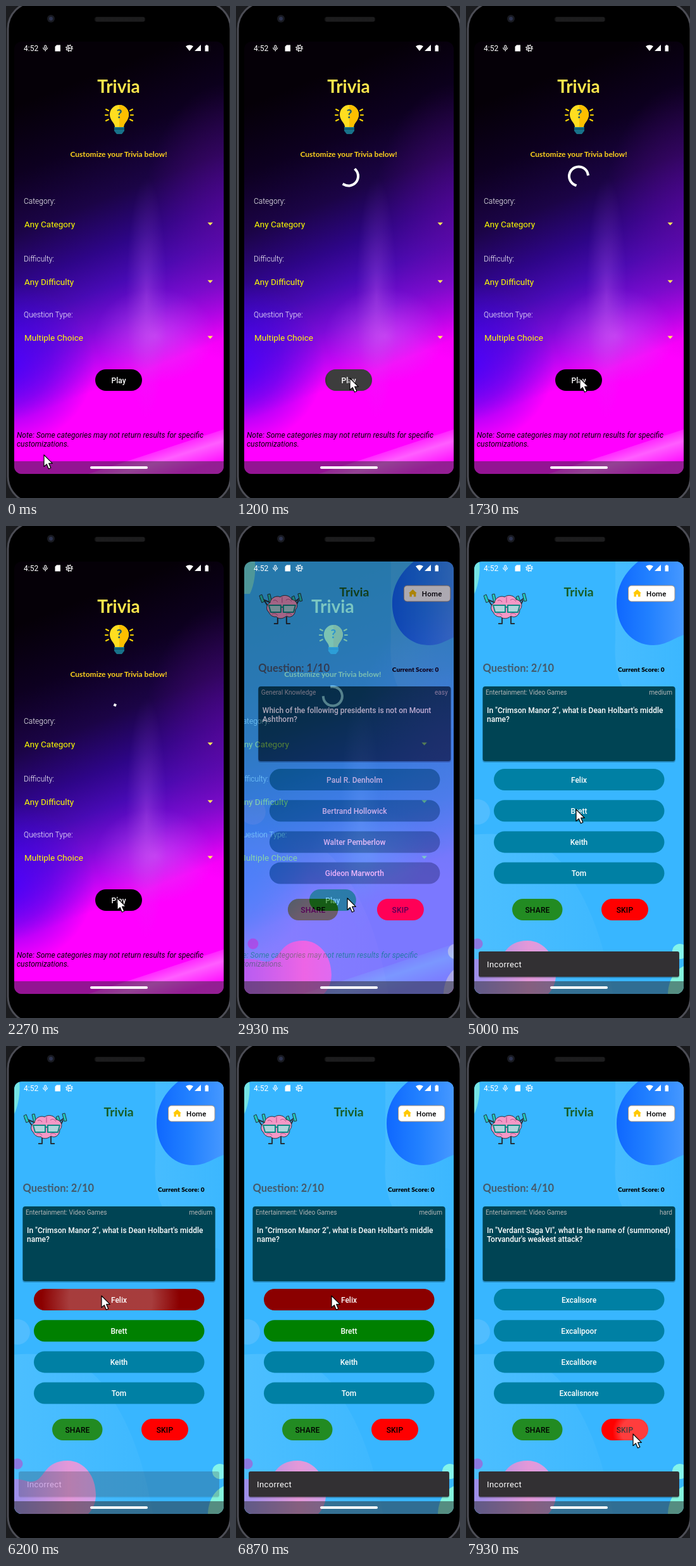
Recreate the animation shown at these times as an HTML page. Size 354x776 px, loop 8000 ms.

```html
<!DOCTYPE html>
<html lang="en">
<head>
<meta charset="utf-8">
<title>Trivia</title>
<style>
html, body { margin: 0; width: 100%; height: 100%; overflow: hidden; background: #000; }
svg { display: block; width: 100%; height: 100%; }
text { font: 500 12px Roboto, sans-serif; fill: #fff; white-space: pre; }
.fun { font-family: Lato, sans-serif; font-weight: 700; }
.mid { text-anchor: middle; }
.end { text-anchor: end; }
.label { font-weight: 300; }
.value { font-weight: 400; font-size: 13.5px; fill: #ff0; }
.note { font-weight: 400; font-style: italic; fill: #000; }
.meta { font-weight: 400; font-size: 10.1px; fill: #b3b5b5; }
.dark { fill: #000; letter-spacing: .2px; }
</style>
</head>
<body>
<svg viewBox="0 0 354 776">
  <defs>
    <clipPath id="screen"><rect x="13" y="56" width="331" height="682" rx="12"/></clipPath>
    <linearGradient id="night" gradientUnits="userSpaceOnUse" x1="100" y1="56" x2="330" y2="640">
      <stop offset=".1" stop-color="#050007"/><stop offset=".26" stop-color="#0d0020"/>
      <stop offset=".4" stop-color="#1b0446"/><stop offset=".52" stop-color="#2e0588"/>
      <stop offset=".61" stop-color="#480ab4"/><stop offset=".7" stop-color="#7c0cd8"/>
      <stop offset=".77" stop-color="#bc06f2"/><stop offset=".84" stop-color="#f0f"/>
    </linearGradient>
    <radialGradient id="blueGlow"><stop offset="0" stop-color="#4600ff" stop-opacity=".9"/><stop offset=".5" stop-color="#3c00f0" stop-opacity=".5"/><stop offset="1" stop-color="#3c00f0" stop-opacity="0"/></radialGradient>
    <radialGradient id="beam"><stop offset="0" stop-color="#d070f4" stop-opacity=".5"/><stop offset="1" stop-color="#b060e0" stop-opacity="0"/></radialGradient>
    <radialGradient id="plum"><stop offset="0" stop-color="#6c089c" stop-opacity=".55"/><stop offset="1" stop-color="#6c089c" stop-opacity="0"/></radialGradient>
    <linearGradient id="streak" gradientUnits="userSpaceOnUse" x1="255" y1="685" x2="272" y2="738">
      <stop offset="0" stop-color="#ff90ff" stop-opacity="0"/><stop offset=".5" stop-color="#ff90ff" stop-opacity=".65"/><stop offset="1" stop-color="#ff90ff" stop-opacity=".15"/>
    </linearGradient>
    <linearGradient id="ocean"><stop offset="0" stop-color="#0f68ff"/><stop offset=".45" stop-color="#2180ff"/><stop offset="1" stop-color="#4a9bff"/></linearGradient>
    <linearGradient id="candy"><stop offset="0" stop-color="#7c86f0"/><stop offset=".35" stop-color="#a890e6"/><stop offset=".75" stop-color="#e498d8"/><stop offset="1" stop-color="#d0a0e8"/></linearGradient>
    <linearGradient id="pale"><stop offset="0" stop-color="#58c4ff"/><stop offset="1" stop-color="#40b9ff"/></linearGradient>
    <radialGradient id="ink" gradientUnits="userSpaceOnUse">
      <stop offset="0" stop-color="#fff" stop-opacity=".24"/><stop offset=".6" stop-color="#fff" stop-opacity=".24"/><stop offset="1" stop-color="#fff" stop-opacity="0"/>
    </radialGradient>
  </defs>

  <!-- phone -->
  <rect width="354" height="776" fill="#1b1c1f"/>
  <rect x="3" y="-6" width="352" height="790" rx="42" fill="#000" stroke="#4c4d55" stroke-width="3"/>
  <circle cx="71" cy="20" r="6" fill="#191b22"/><circle cx="71" cy="20" r="3" fill="#2c3350"/>
  <rect x="140" y="17" width="80" height="8" rx="4" fill="#161617"/>
  <path d="M143 19H218M143 21H218M143 23H218" stroke="#303032" stroke-dasharray="1 1"/>

  <g clip-path="url(#screen)">
    <g id="home">
      <rect x="13" y="56" width="370" height="682" fill="url(#night)"/>
      <ellipse cx="355" cy="340" rx="140" ry="220" fill="url(#plum)"/>
      <ellipse cx="0" cy="565" rx="140" ry="130" fill="url(#blueGlow)"/>
      <ellipse cx="222" cy="460" rx="32" ry="190" fill="url(#beam)" opacity=".6"/>
      <ellipse cx="235" cy="520" rx="95" ry="75" fill="url(#beam)"/>
      <path d="M130 738L383 655V738Z" fill="url(#streak)"/>
      <text class="fun mid" x="178" y="137" style="font-size:28px;fill:#fde74c">Trivia</text>
      <g stroke="#ffd400" stroke-width="2" stroke-linecap="round">
        <path d="M157 172h4M158 163l4 2M158 181l4-2M197 172h4M196 165l4-2M196 179l4 2"/>
      </g>
      <path d="M172 191C172 184 164 181 164 171A15 15 0 0 1 194 171C194 181 186 184 186 191Z" fill="#ffdd20"/>
      <path d="M179 156A15 15 0 0 1 194 171C194 181 186 184 186 191H179Z" fill="#fdbf00"/>
      <path d="M171 191H187V197L183 202H175L171 197Z" fill="#17728a"/><path d="M171 194H187" stroke="#0d4d63" stroke-width="1.5"/>
      <text class="fun mid" x="179" y="177" style="font-size:19px;fill:#14566e">?</text>
      <text class="fun mid" x="178" y="238" style="font-size:12px;fill:#ffd21c">Customize your Trivia below!</text>
      <g id="fields"></g>
      <rect x="141" y="573" width="74" height="34" rx="17"/>
      <text class="mid" x="178" y="595">Play</text>
      <text class="note" x="17" y="681">Note: Some categories may not return results for specific</text>
      <text class="note" x="17" y="695">customizations.</text>
      <circle id="spin" cx="178" cy="268.5" r="15" pathLength="360" fill="none" stroke="#fff" stroke-width="4" stroke-linecap="square"/>
    </g>

    <g id="quiz">
      <rect x="-30" y="56" width="380" height="682" fill="#38b6ff"/>
      <path d="M236 56V180C232 240 250 300 344 322V56Z" fill="url(#pale)" opacity=".45"/>
      <path d="M-30 494C50 474 120 492 150 530C190 585 215 640 232 738H-30Z" fill="url(#pale)" opacity=".7"/>
      <circle cx="18" cy="451" r="20" fill="#50bdff"/>
      <path d="M272 56C250 74 238 96 238 122C238 160 262 188 296 188C318 188 328 176 350 170V56Z" fill="url(#ocean)"/>
      <path d="M-30 56H21C23 75 19 95 13 107H-30Z" fill="#74e4e4"/>
      <path d="M-30 683H13C28 682 34 690 46 686C62 680 62 654 97 654C125 654 142 680 142 708C142 722 136 732 130 738H-30Z" fill="url(#candy)"/>
      <circle cx="18" cy="659" r="8.5" fill="#8c78e0"/>
      <circle cx="338" cy="671" r="12" fill="#84f4ea"/>
      <path d="M319 738C320 716 330 698 350 692V738Z" fill="#84f4dc"/>
      <g stroke="#26323c" stroke-width="1" stroke-linejoin="round">
        <path d="M44 130L36 118M84 130L90 117M57 143V154H51M71 143V154H77" fill="none" stroke-width="2"/>
        <path d="M29 114L46 121M82 121L94 112" stroke-width="2"/>
        <path d="M28 110l4-2 4 11-4 2zM41 108l4-1 3 13-4 1zM79 112l4-2 4 13-4 1zM89 107l4-1 3 12-4 1z" fill="#25c8b8"/>
        <path d="M43 136C37 131 40 123 45 121C46 113 55 109 61 112C67 107 77 110 79 116C87 117 91 126 85 132C85 141 77 146 71 142C64 148 57 146 55 143C50 144 45 141 43 136Z" fill="#f498c6"/>
        <path d="M64 112V121M50 118q4-3 7 2M70 117q5-4 9 2M48 139q5-3 9 2M70 139q6-3 9 1" fill="none" stroke="#b34f88"/>
        <path d="M43 125H62V136H46ZM66 125H85L82 136H66Z" fill="#8ff0e4" fill-opacity=".7" stroke="#0f8a84" stroke-width="2"/>
        <path d="M62 128H66" stroke="#0f8a84" stroke-width="2"/>
      </g>
      <text class="fun mid" x="178" y="111" style="font-size:19.5px;fill:#175c24">Trivia</text>
      <rect x="256.5" y="94" width="73.5" height="25" rx="5" fill="#fff" stroke="#a8927c"/>
      <path d="M264 106L270.5 100L277 106H275.5V111.5H272V108H269V111.5H265.5V106Z" fill="#ffc800"/>
      <text class="dark" x="285" y="110.5" style="font-size:11.5px">Home</text>
      <text id="count" class="fun" x="26.5" y="230" style="font-size:16.5px;fill:#46596a"></text>
      <text id="score" class="fun" y="230" style="font-size:10.1px;font-weight:900;fill:#000">Current Score: 0</text>
      <rect x="26" y="254" width="305" height="119" rx="4" fill="#003040" opacity=".3"/>
      <rect x="26.5" y="253" width="304" height="118" rx="4" fill="#004454"/>
      <text id="topic" class="meta" x="31" y="266"></text>
      <text id="level" class="meta end" x="326" y="266"></text>
      <text id="line0" x="33" y="295"></text>
      <text id="line1" x="33" y="309"></text>
      <g id="answers"></g>
      <rect x="73" y="588" width="79.5" height="34" rx="17" fill="#228b22"/>
      <rect x="214" y="588" width="74" height="34" rx="17" fill="red"/>
      <text class="mid dark" x="113" y="609.5">SHARE</text>
      <text class="mid dark" x="251" y="609.5">SKIP</text>
      <g id="snack">
        <rect x="20" y="672" width="317" height="41" rx="4" opacity=".25"/>
        <rect x="20" y="671" width="317" height="40" rx="3" fill="#323033"/>
        <text x="33" y="696" style="font-size:13px;font-weight:400;letter-spacing:.4px">Incorrect</text>
      </g>
    </g>

    <rect id="ripple" height="34" rx="17" fill="url(#ink)"/>

    <!-- system bars -->
    <rect x="13" y="718" width="331" height="20" fill="#282828" opacity=".5"/>
    <rect x="133" y="726" width="91" height="4" rx="2" fill="#fff"/>
    <text x="28" y="71" style="font-weight:400">4:52</text>
    <g fill="none" stroke="#fff" stroke-width="1.1">
      <rect x="60.8" y="62" width="2.8" height="5" rx="1.4"/>
      <path d="M58.7 65.5a3.5 3.5 0 0 0 7 0M62.2 69v2.5"/>
      <circle cx="100" cy="66.5" r="4"/><circle cx="100" cy="66.5" r="5.3" stroke-dasharray="2 2.16"/>
      <path d="M96 66.5h8M100 66.5l-2-3.5M100 66.5l-2 3.5"/>
    </g>
    <path d="M80 61.5H86V71.5H77.5V64ZM284 63.5Q290 59.5 296 63.5L290 71ZM298 71H308V61ZM314.5 62.5H316V61.5H318.5V62.5H320V71.5H314.5Z" fill="#fff"/>
  </g>

  <path id="cursor" d="M0 0V18.5L4.3 14.7L7.4 22L10.8 20.5L7.7 13.4H13.3Z" fill="#fff" stroke="#000" stroke-width="1.2" stroke-linejoin="round"/>
</svg>

<script>
const LOOP = 8000;
const $ = id => document.getElementById(id);
const set = (el, attrs) => { for (const k in attrs) el.setAttribute(k, attrs[k]); };
const ramp = (t, a, b) => Math.min(1, Math.max(0, (t - a) / (b - a)));
const mix = (a, b, p) => a + (b - a) * p;

// y of a cubic Bezier at a given x
const cubic = (a, b, c, d, s) =>
  a * (1 - s) ** 3 + 3 * b * s * (1 - s) ** 2 + 3 * c * s * s * (1 - s) + d * s ** 3;
function curve(x, xs, ys) {
  let lo = 0, hi = 1;
  for (let i = 0; i < 24; i++) {
    const m = (lo + hi) / 2;
    if (cubic(...xs, m) < x) lo = m; else hi = m;
  }
  return cubic(...ys, lo);
}
const smooth = x => curve(x, [0, .4, .2, 1], [0, 0, 1, 1]);
const emphasized = x => x < 1 / 6
  ? curve(x, [0, .05, .1333, .16667], [0, 0, .06, .4])
  : curve(x, [.16667, .20833, .25, 1], [.4, .82, 1, 1]);

const GAMES = "Entertainment: Video Games";
const questions = [
  { at: 0, topic: "General Knowledge", level: "easy",
    lines: ["Which of the following presidents is not on Mount", "Ashthorn?"],
    answers: ["Paul R. Denholm", "Bertrand Hollowick", "Walter Pemberlow", "Gideon Marworth"],
    reveal: 4310, wrong: 1, right: 0 },
  { at: 4920, topic: GAMES, level: "medium",
    lines: ['In "Crimson Manor 2", what is Dean Holbart\'s middle', "name?"],
    answers: ["Felix", "Brett", "Keith", "Tom"],
    reveal: 6150, wrong: 0, right: 1 },
  { at: 6925, topic: GAMES, level: "hard",
    lines: ["Which of these keys opens the last gate of the", "sunken tower?"],
    answers: ["Copper Key", "Silver Key", "Marble Key", "Amber Key"] },
  { at: 7865, topic: GAMES, level: "hard",
    lines: ['In "Verdant Saga VI", what is the name of (summoned)', "Torvandur's weakest attack?"],
    answers: ["Excalisore", "Excalipoor", "Excalibore", "Excalisnore"] },
];

// start, end, from, control, to
const moves = [
  [10, 470, [60, 708], [125, 650], [180, 587]],
  [1800, 2000, [180, 587], [178, 587], [176, 587]],
  [3420, 3930, [176, 587], [232, 515], [174, 447]],
  [5550, 5930, [174, 447], [163, 420], [151, 394]],
  [7150, 7670, [151, 394], [215, 490], [264, 612]],
];

// start, pointer x and y, button x, y and width, full radius
const taps = [
  [900, 180, 590, 141, 573, 74, 60],
  [4257, 174, 449, 44, 432, 269.5, 165],
  [6080, 165, 400, 44, 383, 269.5, 165],
  [7850, 266, 608, 214, 588, 74, 70],
];

$("fields").innerHTML = [
  ["Category:", "Any Category", 312],
  ["Difficulty:", "Any Difficulty", 403],
  ["Question Type:", "Multiple Choice", 491],
].map(([label, value, y]) => `
  <text class="label" x="28" y="${y}">${label}</text>
  <text class="value" x="29" y="${y + 36.5}">${value}</text>
  <path d="M318.5 ${y + 29.5}h8.5l-4.25 4.5z" fill="#ffee58"/>`).join("");

$("answers").innerHTML = [0, 1, 2, 3].map(i => `
  <rect x="44" y="${383 + i * 49.2}" width="269.5" height="34" rx="17"/>
  <text class="mid" x="178.5" y="${404.5 + i * 49.2}"></text>`).join("");
const pills = $("answers").querySelectorAll("rect");
const labels = $("answers").querySelectorAll("text");

function drawQuestion(t) {
  const n = questions.findLastIndex(q => t >= q.at);
  const q = questions[n];
  $("count").textContent = `Question: ${n + 1}/10`;
  set($("score"), { x: n ? 240 : 238 });
  $("topic").textContent = q.topic;
  $("level").textContent = q.level;
  q.lines.forEach((s, i) => $("line" + i).textContent = s);
  q.answers.forEach((s, i) => {
    labels[i].textContent = s;
    const shown = t >= q.reveal;
    set(pills[i], { fill: shown && i === q.wrong ? "#8b0000" : shown && i === q.right ? "#008000" : "#0080a4" });
  });
}

function drawScreens(t) {
  const p = emphasized(ramp(t, 2826, 3276));
  set($("home"), { transform: `translate(${-34 * p})`, display: t < 3276 ? "inline" : "none" });
  set($("quiz"), { transform: `translate(${34 * (1 - p)})`, opacity: ramp(t, 2876, 2959) });
}

function drawSpinner(t) {
  const x = Math.max(0, t - 937) % 1333 / 1333;
  const head = smooth(Math.min(1, 2 * x)), tail = smooth(Math.max(0, 2 * x - 1));
  const start = 112 + .162 * (t - 2270) + 90 * x + 270 * tail;
  set($("spin"), {
    display: t < 925 ? "none" : "inline",
    "stroke-dasharray": `${Math.max(.5, 270 * (head - tail))} 360`,
    transform: `rotate(${start} 178 268.5)`,
  });
}

function drawRipple(t) {
  const tap = taps.findLast(k => t >= k[0]);
  if (!tap) return set($("ripple"), { opacity: 0 });
  const [at, cx, cy, x, y, width, full] = tap;
  const r = full * (1 - (1 - ramp(t, at, at + 400)) ** 3);
  set($("ink"), { cx, cy, r: Math.max(r, .1) });
  set($("ripple"), { x, y, width, opacity: 1 - ramp(t, at + 300, at + 620) });
}

function drawSnack(t) {
  const start = t < 6230 ? 4320 : 6240;
  const a = ramp(t, start, start + 150);
  const s = mix(.8, 1, 1 - (1 - a) ** 2);
  const out = t < 6230 ? ramp(t, 6145, 6220) : 0;
  set($("snack"), {
    opacity: a * (1 - out),
    transform: `translate(178.5 691) scale(${s}) translate(-178.5 -691)`,
  });
}

function drawCursor(t) {
  const [a, b, from, via, to] = moves.findLast(m => t >= m[0]) || moves[0];
  const u = ramp(t, a, b), p = u * u * (3 - 2 * u);
  const [x, y] = from.map((v, i) => mix(mix(v, via[i], p), mix(via[i], to[i], p), p));
  set($("cursor"), { transform: `translate(${x} ${y})` });
}

const parts = [drawQuestion, drawScreens, drawSpinner, drawRipple, drawSnack, drawCursor];
const begin = performance.now();
function frame() {
  const t = (performance.now() - begin) % LOOP;
  parts.forEach(draw => draw(t));
  requestAnimationFrame(frame);
}
frame();
</script>
</body>
</html>
```
